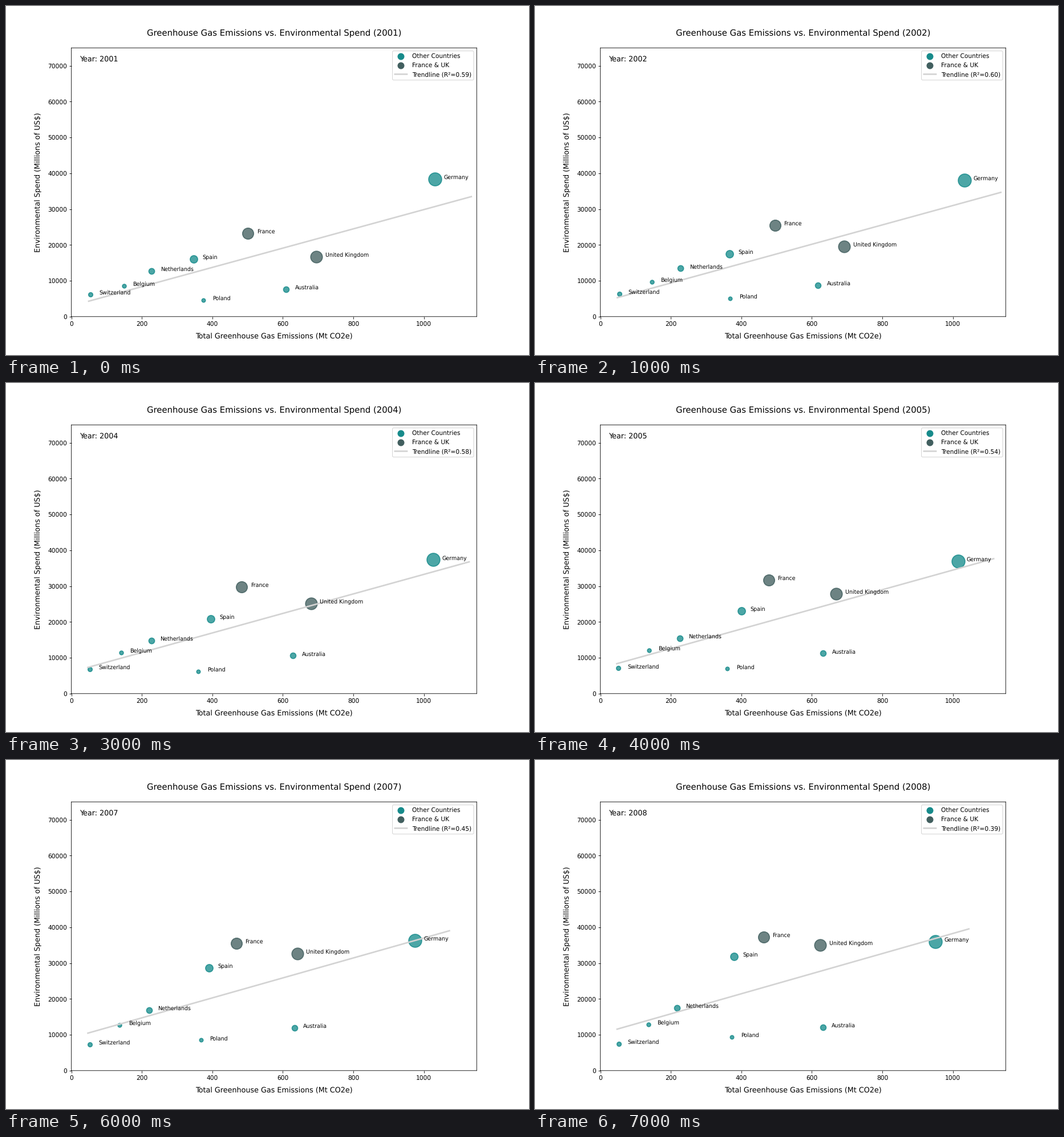
A matplotlib script for the animation above (8000 ms loop, 917 by 611 pixels).

```python
import math

import numpy as np
import matplotlib.pyplot as plt
from matplotlib.animation import FuncAnimation

plt.rcParams["text.hinting"] = "none"
plt.rcParams["path.snap"] = False

W, H, DPI = 917, 611, 76.4
TEAL, SLATE, GREY = "teal", "darkslategray", "lightgray"
FOCUS = ("France", "United Kingdom")
FIRST, YEARS = 2001, 8
EDGE = 1.5

# emissions and spend as (first, last, bulge), bubble diameter in pixels
COUNTRIES = {
    "Switzerland": ((54.5, 52.7, -2), (6140, 7450, 200), 9.2),
    "Belgium": ((149, 136.4, -3), (8570, 12950, 1000), 8.5),
    "Netherlands": ((227.5, 217.3, 4), (12760, 17500, 0), 11.8),
    "Spain": ((347, 379.5, 35), (16100, 31830, -2000), 14.8),
    "Poland": ((375, 373.3, -14), (4540, 9380, -400), 8.1),
    "France": ((501.3, 463.2, -2), (23290, 37250, 500), 21.1),
    "Australia": ((609.8, 631.3, 10), (7690, 12150, 1000), 11.6),
    "United Kingdom": ((695.5, 624.3, 15), (16640, 35000, 700), 22.2),
    "Germany": ((1031.5, 950.4, 30), (38400, 35970, 0), 24.5),
}


def path(first, last, bulge, t):
    """Straight run from first to last, bowed in the middle."""
    return first + (last - first) * t + bulge * math.sin(math.pi * t)


def bubble(name, x, y, diameter):
    size = (diameter * 72 / DPI - EDGE) ** 2
    color = SLATE if name in FOCUS else TEAL
    ax.scatter(x, y, s=size, color=color, alpha=0.7, linewidths=EDGE)
    ax.text(x + 25, y, name, fontsize=9)


def trendline(xs, ys):
    ends = np.array([min(xs) * 0.9, max(xs) * 1.1])
    r2 = np.corrcoef(xs, ys)[0, 1] ** 2
    line, = ax.plot(ends, np.polyval(np.polyfit(xs, ys, 1), ends), color=GREY,
                    lw=2.5, label=f"Trendline (R²={r2:.2f})")
    return line


def key(color, label):
    return ax.scatter([], [], s=128, color=color, alpha=0.91, linewidths=0,
                      label=label)


fig, ax = plt.subplots(figsize=((W + 0.005) / DPI, (H + 0.005) / DPI), dpi=DPI)


def draw(frame):
    ax.clear()
    year = FIRST + frame
    t = frame / (YEARS - 1)

    xs, ys = [], []
    for name, (emissions, spend, diameter) in COUNTRIES.items():
        xs.append(path(*emissions, t))
        ys.append(path(*spend, t))
        bubble(name, xs[-1], ys[-1], diameter)

    handles = [key(TEAL, "Other Countries"), key(SLATE, "France & UK"),
               trendline(xs, ys)]
    ax.legend(handles=handles, loc="upper right", fontsize=10)

    ax.set_xlim(0, 1150)
    ax.set_ylim(0, 75000)
    ax.set_xlabel("Total Greenhouse Gas Emissions (Mt CO2e)", fontsize=12,
                  labelpad=10)
    ax.set_ylabel("Environmental Spend (Millions of US$)", fontsize=12,
                  labelpad=10)
    ax.set_title(f"Greenhouse Gas Emissions vs. Environmental Spend ({year})",
                 fontsize=14, pad=20)
    ax.text(0.02, 0.95, f"Year: {year}", transform=ax.transAxes, fontsize=12)
    return []


anim = FuncAnimation(fig, draw, frames=YEARS, interval=1000,
                     init_func=lambda: [], repeat=True, repeat_delay=0)
plt.show()
```
